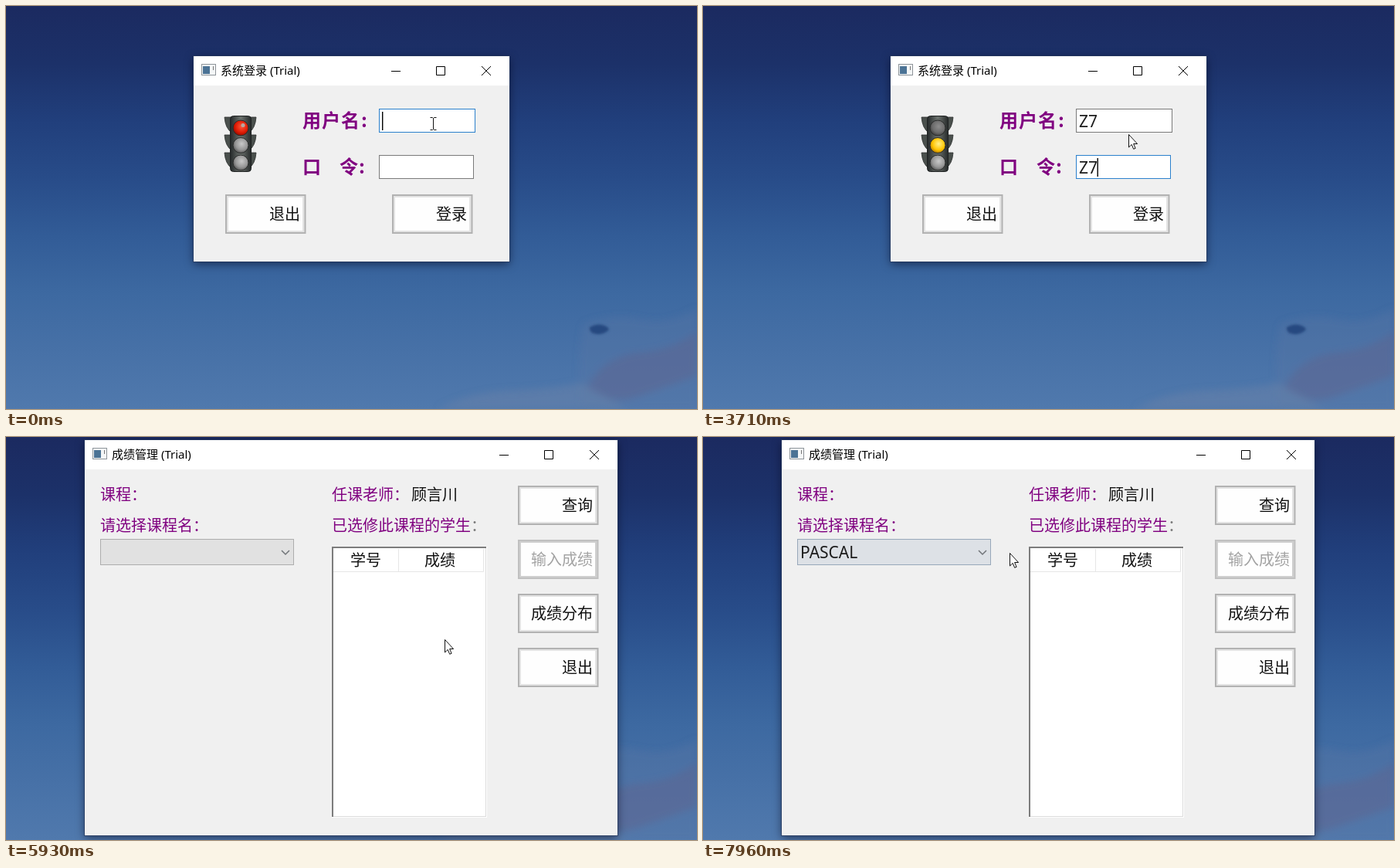
An HTML page that plays this animation: 895x522 px, repeating every 8000 ms.

```html
<!DOCTYPE html>
<html lang="zh-CN">
<head>
<meta charset="utf-8">
<title>系统登录</title>
<style>
html, body { margin: 0; width: 100%; height: 100%; overflow: hidden; background: #2d5590; }
svg { display: block; width: 895px; height: 522px; }
text { font: 300 20px "Noto Sans CJK SC", "Noto Sans CJK", sans-serif; fill: #111; white-space: pre; }
.title { font: 400 15px "Noto Sans", "Noto Sans CJK SC", "Noto Sans CJK", sans-serif; fill: #000; }
.edit { font: 400 21px "Noto Sans", "Open Sans", sans-serif; fill: #1c1c1c; }
.label { fill: #800080; }
.bold { font-size: 24px; font-weight: 700; letter-spacing: 1px; }
.ctl { fill: none; stroke: #000; }
.btn .edge { fill: #e3e3e3; stroke: #b2b2b2; stroke-width: 2; }
.btn.off .edge { fill: #cfcfcf; stroke: #c0c0c0; }
.btn.off text { fill: #a3a3a3; }
.btn.hot .edge { fill: #e5f1fb; stroke: #3a8fd6; }
.btn.down .edge { fill: #cce4f7; stroke: #1f6fb4; }
.box { fill: #fff; stroke: #7a7a7a; }
.box.on { stroke: #2b80cc; }
.idle .title { fill: #999; }
.idle .ctl { stroke: #999; }
.shade { fill: #fff; filter: drop-shadow(0 3px 6px rgba(0, 0, 20, .55)); }
.frame { fill: none; stroke: #27395f; stroke-opacity: .7; }
</style>
</head>
<body>
<svg id="stage" viewBox="0 0 895 522"></svg>
<script>
const TICK = 92.6, LOOP = 8000;

const rect = (x, y, w, h, attrs = '') =>
  `<rect x="${x}" y="${y}" width="${w}" height="${h}" ${attrs}/>`;
const text = (x, y, s, attrs = '') => `<text x="${x}" y="${y}" ${attrs}>${s}</text>`;
const label = (x, y, s, cls = '') => text(x, y, s, `class="label ${cls}"`);

const button = (x, y, s, attrs = 'class="btn"', extra = '') =>
  `<g ${attrs} transform="translate(${x} ${y})">` +
  rect(1, 1, 102.5, 49, 'class="edge"') + rect(4, 4, 96, 43, 'fill="#fefefe"') +
  text(97, 33, s, 'text-anchor="end"') + extra + '</g>';

const titleBar = (x, y, w, s) => {
  const r = x + w;
  return rect(x, y, w, 38, 'fill="#fff"') +
    rect(x + 10.5, y + 10.5, 18, 14, 'fill="#f4f6f7" stroke="#8d9499"') +
    rect(x + 12, y + 13, 9, 10, 'fill="#4b7395"') +
    rect(x + 25, y + 13, 1, 5, 'fill="#777"') +
    text(x + 35, y + 24, s, 'class="title"') +
    `<path class="ctl" d="M${r - 153} ${y + 19.5}h12M${r - 94.5} ${y + 13.5}h11v11h-11z` +
    `M${r - 36} ${y + 13}l12 12m0-12l-12 12"/>`;
};

const lampGrad = (id, a, b, c) =>
  `<radialGradient id="${id}" cx=".56" cy=".4" r=".62"><stop stop-color="${a}"/>` +
  `<stop offset=".65" stop-color="${b}"/><stop offset="1" stop-color="${c}"/></radialGradient>`;

const sky = ['#1b2a60', '#1c3169', '#213f7c', '#284c89', '#325c97', '#3d69a1', '#4771a7', '#5079ad'];

const defs = `<defs>
  <linearGradient id="sky" x2="0" y2="1">${sky.map((c, i) =>
    `<stop offset="${i / (sky.length - 1)}" stop-color="${c}"/>`).join('')}</linearGradient>
  <linearGradient id="metal"><stop stop-color="#25292a"/><stop offset=".5" stop-color="#6d736f"/>
    <stop offset="1" stop-color="#262a2a"/></linearGradient>
  ${lampGrad('gray', '#c9c9c9', '#959595', '#555')}
  ${lampGrad('dim', '#8d8d8d', '#6b6b6b', '#3e3e3e')}
  ${lampGrad('red', '#ff5a3c', '#de1a04', '#8e0d00')}
  ${lampGrad('yellow', '#fff08a', '#ffc400', '#b47a00')}
  ${lampGrad('green', '#b8ff9a', '#22e81c', '#0a8a12')}
  <filter id="soft" x="-30%" y="-30%" width="160%" height="160%"><feGaussianBlur stdDeviation="5"/></filter>
  <filter id="haze" x="-30%" y="-30%" width="160%" height="160%"><feGaussianBlur stdDeviation="1.5"/></filter>
  <clipPath id="hole">${rect(102, 42, 490, 474)}</clipPath>
</defs>`;

const backdrop = rect(0, 0, 895, 522, 'fill="url(#sky)"') +
  `<g filter="url(#soft)">
    <path d="M748 412q40-14 75-6t72-14v130H745q-6-60 3-110z" fill="#5a76a4" opacity=".35"/>
    <path d="M752 495q22-42 68-46t75-28v58q-50 18-80 28t-63-12z" fill="#60658f" opacity=".5"/>
    <path d="M560 522q40-22 95-24t90-10l60 34z" fill="#6a82a8" opacity=".5"/>
  </g>
  <path filter="url(#haze)" d="M756 416q8-5 16-3t9 6q-6 7-16 6t-9-9z" fill="#274a80"/>`;

const fin = y => `<path d="M283 ${y}h41q-1 14-9 20h-23q-8-6-9-20z" fill="#4a504d" stroke="#2b2f2e" stroke-width=".8"/>`;
const lamp = (id, y) => `<circle id="${id}" cx="304" cy="${y}" r="10" stroke="#2a2c2b"/>`;
const trafficLight = [144, 167, 190].map(fin).join('') +
  rect(290.5, 142.5, 27, 72, 'rx="4" fill="url(#metal)" stroke="#1f2222"') +
  lamp('lampTop', 158) + lamp('lampMid', 180.5) + lamp('lampLow', 203) +
  '<circle id="glint" cx="307" cy="154.500" r="2.500" fill="#b9a9a2"/>';

const login = `<g id="login">` +
  rect(243, 65, 409, 266, 'class="shade"') +
  titleBar(243, 65, 409, '系统登录 (Trial)') +
  rect(243, 103, 409, 228, 'fill="#f0f0f0"') + rect(242.5, 64.5, 410, 267, 'class="frame"') +
  trafficLight +
  label(384, 157, '用户名', 'bold') + label(460, 157, ':', 'bold') +
  label(384, 217, '口', 'bold') + label(432, 217, '令', 'bold') + label(457, 217, ':', 'bold') +
  rect(483.5, 133.5, 124, 30, 'id="userBox" class="box"') + text(487, 157, '', 'id="user" class="edit"') +
  rect(483.5, 193.5, 122, 30, 'id="passBox" class="box"') + text(487, 217, '', 'id="pass" class="edit"') +
  rect(0, 0, 1.4, 24, 'id="caret"') +
  button(284, 244, '退出') +
  button(500, 244, '登录', 'id="enter" class="btn"',
    rect(4.5, 4.5, 96, 42, 'id="dots" fill="none" stroke="#222" stroke-dasharray="1 1"')) + '</g>';

const table = rect(422, 142, 201, 351, 'fill="#fff"') +
  '<path d="M422 143h200M423 142v350" stroke="#7c7c7c" stroke-width="2"/>' +
  '<path d="M621.5 144v348M424 491.500h198" stroke="#dcdcdc"/>' +
  '<path d="M424 174.500h194.500V145M508.500 145v29" fill="none" stroke="#e6e6e6"/>' +
  text(446, 167, '学号') + text(542, 167, '成绩');

const manager = `<g id="manager">` +
  rect(102, 4, 690, 512, 'class="shade"') +
  titleBar(102, 4, 690, '成绩管理 (Trial)') +
  rect(102, 42, 690, 474, 'fill="#f0f0f0"') + rect(101.5, 3.5, 691, 513, 'class="frame"') +
  label(122, 82, '课程：') + label(122, 122, '请选择课程名：') +
  label(422, 82, '任课老师：') + text(525, 82, '顾言川') +
  label(422, 122, '已选修此课程的学生', 'id') + text(602, 122, '：', 'style="fill:#777"') +
  table +
  button(663, 63, '查询') + button(663, 133, '输入成绩', 'class="btn off"') +
  button(663, 203, '成绩分布') + button(663, 273, '退出') +
  rect(122.5, 132.5, 250, 33, 'id="combo"') + text(126, 157, '', 'id="course" class="edit"') +
  '<path id="chevron" d="M357 147l5 5 5-5" fill="none" stroke-width="1.5"/>' +
  '<g id="list">' + rect(122.5, 166.5, 250, 27, 'fill="#fff" stroke="#777"') +
  rect(123, 167, 249, 24, 'id="row"') + text(126, 186.5, 'PASCAL', 'id="item" class="edit"') + '</g>' +
  '<g id="unpainted" clip-path="url(#hole)"><use href="#desk"/></g></g>';

const pointers =
  '<path id="beam" d="M549.500 144.500h3l1 1 1-1h3M553.500 145v15M549.500 160.500h3l1-1 1 1h3" fill="none" stroke="#111"/>' +
  '<path id="arrow" d="M.5.5v16.500l3.700-3.600 2.500 5.900 2.400-1-2.500-5.800h5z" fill="#fff" stroke="#111"/>';

document.getElementById('stage').innerHTML =
  defs + `<g id="desk">${backdrop}${login}</g>` + manager + pointers;

const $ = id => document.getElementById(id);
const show = (id, on) => { $(id).style.display = on ? '' : 'none'; };
const set = (id, name, v) => $(id).setAttribute(name, v);

// Pointer track: tick, x, y
const track = [
  [22, 552, 150], [25, 549, 163], [33, 549, 163], [34, 551, 166], [40, 551, 166],
  [47, 566, 260], [58, 566, 260], [59, 568, 262], [68, 568, 262], [73, 353, 150],
  [75, 353, 150], [77, 351, 156], [79, 346, 171], [82, 346, 171], [86, 397, 150]
];
const ease = k => k * k * (3 - 2 * k);
function pointerAt(n) {
  const i = track.findIndex(p => p[0] >= n);
  if (i < 1) return track[i < 0 ? track.length - 1 : 0].slice(1);
  const [a, x, y] = track[i - 1], [b, u, v] = track[i];
  const k = ease((n - a) / (b - a));
  return [Math.round(x + (u - x) * k), Math.round(y + (v - y) * k)];
}

const typed = (s, n, a, b) => s.slice(0, (n >= a) + (n >= b));
const within = (n, a, b) => n >= a && n < b;

function draw(n) {
  const stage = n < 27 ? 0 : n < 49 ? 1 : 2;
  set('lampTop', 'fill', stage ? 'url(#dim)' : 'url(#red)');
  set('lampMid', 'fill', stage === 1 ? 'url(#yellow)' : 'url(#gray)');
  set('lampLow', 'fill', stage === 2 ? 'url(#green)' : 'url(#gray)');
  show('glint', !stage);

  const user = typed('Z7', n, 11, 18), pass = typed('Z7', n, 34, 37);
  $('user').textContent = user;
  $('pass').textContent = pass;
  set('userBox', 'class', stage === 0 ? 'box on' : 'box');
  set('passBox', 'class', stage === 1 ? 'box on' : 'box');
  set('caret', 'x', [487, 499.5, 510.5][(stage ? pass : user).length]);
  set('caret', 'y', stage ? 197 : 137);
  show('caret', stage < 2 && !within(n, 6, 11) && !within(n, 23, 27) && !within(n, 32, 34) && !within(n, 43, 49));

  set('enter', 'class', 'btn' + (n >= 46 ? ' hot' : '') + (n === 53 ? ' down' : ''));
  show('dots', stage === 2);
  set('login', 'class', n >= 63 ? 'idle' : '');

  show('manager', n >= 63);
  show('unpainted', n === 63);
  const hot = within(n, 72, 84);
  set('combo', 'fill', hot ? '#e1e9f0' : n >= 84 ? '#dde1e6' : '#e1e1e1');
  set('combo', 'stroke', hot ? '#5b9bd2' : n >= 84 ? '#98a8ba' : '#adadad');
  set('chevron', 'stroke', hot ? '#41729f' : '#707478');
  show('chevron', n !== 63);
  $('course').textContent = n >= 83 ? 'PASCAL' : '';
  show('list', within(n, 76, 83));
  set('row', 'fill', n >= 78 ? '#0078d7' : '#fff');
  $('item').style.fill = n >= 78 ? '#fff' : '';

  show('beam', n < 23);
  show('arrow', n >= 23);
  set('arrow', 'transform', `translate(${pointerAt(n)})`);
}

const start = performance.now();
function loop() {
  const t = (performance.now() - start) % LOOP;
  draw(Math.floor((t + 5) / TICK));
  requestAnimationFrame(loop);
}
loop();
</script>
</body>
</html>
```
